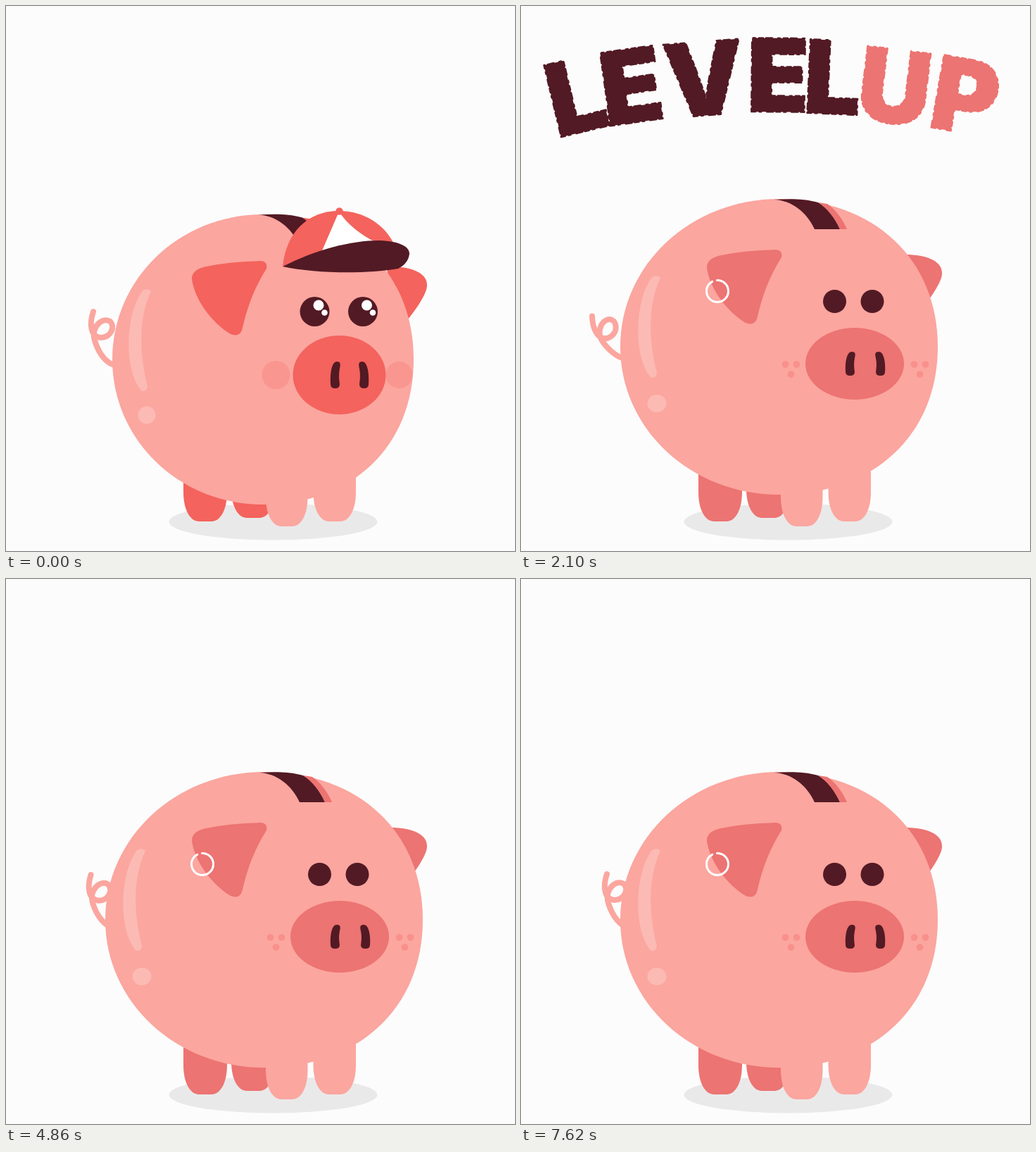
These frames come from a looping animation (723 by 774 pixels, 8100 ms). An HTML page with a canvas:

```html
<!DOCTYPE html>
<html lang="en">
<head>
<meta charset="utf-8">
<title>Level up piggy bank</title>
<style>
  html, body { margin: 0; width: 100%; height: 100%; overflow: hidden; background: #fcfcfc; }
  canvas { display: block; }
</style>
</head>
<body>
<canvas id="stage" width="723" height="774"></canvas>
<script>
const ctx = document.getElementById('stage').getContext('2d');
const LOOP = 8100, STEP = 30;
const BG = '#fcfcfc', SKIN = '#fba69f', DARK = '#521a24', ROSE = '#ec7472', CORAL = '#f4635d';
const SHINE = '#fcbab4', SHADE = '#eae9e9';
const RAD = Math.PI / 180;

// Upright tail, drawn around its pivot
const TAIL = new Path2D('M-50-70C-56-52-54-34-39-33C-24-34-19-49-26-56C-36-63-54-49-48-29C-42-9-31 3-20 6L-8 8');
const EAR = new Path2D('M290 353C315 348 340 347 362 346Q372 347 370 357C353 384 343 410 335.5 443Q332 455 319 450C290 432 268 400 264 372C264 360 275 355 290 353Z');
const FAR_EAR = new Path2D('M540 353C575 352 600 362 598 381C597 395 575 425 560 440Z');
const SLOT = new Path2D('M359 275C385 276 406 293 417 317L453 317C446 301 435 287 422 279C400 273 380 274 359 275Z');
const SLOT_EDGE = new Path2D('M422 279C435 287 446 301 453 317L463 317C457 303 448 290 435 281Z');
const GLOSS = new Path2D('M194 404Q202 400 206 405C192 435 186 480 201 540Q200 548 193 547C168 520 168 440 194 404Z');
const NOSTRIL = new Path2D('M-7 13C-8-4-5-19 2-19C8-19 7-14 6-9C4.5-1 5 6 6 13Q6 19-.5 19Q-7 19-7 13Z');
const CAP = new Path2D('M393 370C398 320 430 291 473 291C510 291 538 312 550 336L520 360Z');
const CAP_PANEL = new Path2D('M473 292L447 352L526 336Q490 318 473 292Z');
const BRIM = new Path2D('M393 370C440 346 490 333 530 333C560 334 573 342 573 352C572 362 565 369 557 373C510 381 440 380 393 370Z');

const WORDS = [
  { color: DARK, enter: 1087, leave: 2900, letters: [
    ['L', 79, 127, -13.5], ['E', 157, 113, -8], ['V', 260, 103, -4.5], ['E', 365.5, 98, 0.5], ['L', 444, 101, 2.5]] },
  { color: ROSE, enter: 1260, leave: 3400, letters: [
    ['U', 531, 114.5, 7], ['P', 633, 128, 10]] }
];
const RISE = 400, STAGGER = 15, DROP = 125;

const clamp = v => Math.max(0, Math.min(1, v));
const ease = v => { v = clamp(v); return v * v * (3 - 2 * v); };

function ellipse(x, y, rx, ry, color) {
  ctx.fillStyle = color;
  ctx.beginPath();
  ctx.ellipse(x, y, rx, ry, 0, 0, 2 * Math.PI);
  ctx.fill();
}

const dot = (x, y, r, color) => ellipse(x, y, r, r, color);

function shape(path, color, dx = 0, dy = 0) {
  ctx.save();
  ctx.translate(dx, dy);
  ctx.fillStyle = color;
  ctx.fill(path);
  ctx.restore();
}

// Round belly, a little fuller on the side of the face
function belly(x, y, rx, ry) {
  const back = 0.555, face = 0.595;
  ctx.fillStyle = SKIN;
  ctx.beginPath();
  ctx.moveTo(x, y - ry);
  ctx.bezierCurveTo(x + rx * face, y - ry, x + rx, y - ry * face, x + rx, y);
  ctx.bezierCurveTo(x + rx, y + ry * face, x + rx * face, y + ry, x, y + ry);
  ctx.bezierCurveTo(x - rx * back, y + ry, x - rx, y + ry * back, x - rx, y);
  ctx.bezierCurveTo(x - rx, y - ry * back, x - rx * back, y - ry, x, y - ry);
  ctx.fill();
}

function leg(x, w, bottom, color) {
  const r = x + w, y = bottom - 42;
  ctx.fillStyle = color;
  ctx.beginPath();
  ctx.moveTo(x, 620);
  ctx.lineTo(x, y);
  ctx.bezierCurveTo(x, bottom - 14, x + 11, bottom, x + 22, bottom);
  ctx.lineTo(r - 22, bottom);
  ctx.bezierCurveTo(r - 11, bottom, r, bottom - 14, r, y);
  ctx.lineTo(r, 620);
  ctx.fill();
}

function tail(x, y, angle) {
  ctx.save();
  ctx.translate(x, y);
  ctx.rotate(-angle * RAD);
  ctx.strokeStyle = SKIN;
  ctx.lineWidth = 8;
  ctx.lineCap = ctx.lineJoin = 'round';
  ctx.stroke(TAIL);
  ctx.restore();
}

function nostrils(x, y, gap, sy) {
  for (const side of [-1, 1]) {
    ctx.save();
    ctx.translate(x + side * gap, y);
    ctx.scale(-side, sy);
    ctx.fillStyle = DARK;
    ctx.fill(NOSTRIL);
    ctx.restore();
  }
}

function torso(x, y, rx, ry, color, stretch) {
  leg(252, 62, 732 + stretch, color);
  leg(320, 62, 727 + stretch, color);
  belly(x, y, rx, ry);
  leg(369, 59.5, 739 + stretch, SKIN);
  leg(436.5, 60.5, 732 + stretch, SKIN);
}

function capPig(angle, stretch) {
  shape(FAR_EAR, CORAL, 0, 17);
  tail(174, 504, angle);
  torso(365, 502, 214, 206, CORAL, stretch);
  shape(SLOT, DARK, -1, 21.5);
  shape(SLOT_EDGE, CORAL, -1, 21.5);
  shape(EAR, CORAL, 0, 16);
  shape(GLOSS, SHINE);
  dot(200, 581, 12.5, SHINE);
  dot(383.5, 524, 20, '#f99690');
  dot(558.5, 524, 19, '#f99690');
  for (const x of [438.5, 507]) {
    dot(x, 434, 21, DARK);
    dot(x + 5.5, 425, 7.5, '#fff');
    dot(x + 14, 435.5, 4.3, '#fff');
  }
  ellipse(473.5, 524, 66, 56, CORAL);
  nostrils(488, 524, 20, 1);
  shape(CAP, CORAL);
  shape(CAP_PANEL, '#fff');
  shape(BRIM, DARK);
  dot(473.5, 291.5, 5.2, CORAL);
}

function ringPig(angle, stretch) {
  shape(FAR_EAR, ROSE);
  tail(172, 489, angle);
  torso(366.5, 484, 225.5, 210, ROSE, stretch);
  shape(SLOT, DARK);
  shape(SLOT_EDGE, ROSE);
  shape(EAR, ROSE);
  shape(GLOSS, SHINE, -8, -19);
  ellipse(193, 564.5, 13.5, 12.5, SHINE);
  ctx.strokeStyle = '#fff';
  ctx.lineWidth = 3;
  ctx.lineCap = 'round';
  ctx.beginPath();
  ctx.arc(279, 405, 15.5, -92 * RAD, 242 * RAD);
  ctx.stroke();
  for (const x of [445.5, 499]) dot(x, 419.5, 16.5, DARK);
  for (const x of [375.5, 558.5]) {
    dot(x, 509, 4.8, '#f8908b');
    dot(x + 16, 509, 4.8, '#f8908b');
    dot(x + 8, 523, 4.8, '#f8908b');
  }
  ellipse(474, 508, 70, 51, ROSE);
  nostrils(489, 508, 21, 0.9);
}

// Uneven dashes along the outline give the letters their rough edge
function letter([char, x, y, tilt], drop, color) {
  ctx.save();
  ctx.translate(x + drop * (430 - x) / 1000, y + drop);
  ctx.rotate(tilt * (1 - 0.4 * drop / DROP) * RAD);
  const m = ctx.measureText(char);
  const dx = (m.actualBoundingBoxLeft - m.actualBoundingBoxRight) / 2;
  const dy = (m.actualBoundingBoxAscent - m.actualBoundingBoxDescent) / 2;
  ctx.fillStyle = ctx.strokeStyle = color;
  ctx.fillText(char, dx, dy);
  ctx.strokeText(char, dx, dy);
  ctx.restore();
}

function title(t) {
  ctx.save();
  // Letters rise from behind an arc under the title
  ctx.beginPath();
  ctx.rect(0, 0, 723, 774);
  ctx.arc(360, 1411, 1250, 0, 2 * Math.PI);
  ctx.clip('evenodd');
  ctx.beginPath();
  ctx.rect(0, 0, 723, 240);
  ctx.clip();
  ctx.font = '900 144px Inter, "Open Sans", sans-serif';
  ctx.textAlign = 'left';
  ctx.textBaseline = 'alphabetic';
  ctx.lineWidth = 2.4;
  ctx.lineCap = ctx.lineJoin = 'round';
  ctx.setLineDash([6, 5, 3, 8, 9, 4]);
  for (const { color, enter, leave, letters } of WORDS) {
    letters.forEach((glyph, i) => {
      const late = t - i * STAGGER;
      const shown = ease((late - enter) / RISE) - ease((late - leave) / RISE);
      if (shown > 0) letter(glyph, DROP * (1 - shown), color);
    });
  }
  ctx.restore();
}

function wag(t) {
  if (t < 900) return 0;
  const phase = (Math.min(t, 7620) - 900) / 570;
  return 42 * Math.cos(Math.PI * (phase - 0.26)) ** 6;
}

function draw(t) {
  ctx.fillStyle = BG;
  ctx.fillRect(0, 0, 723, 774);
  ellipse(379.5, 732.5, 148, 26, SHADE);
  const u = clamp((t - 900) / 720);
  const hop = 4 * u * (1 - u);
  const pig = t < 1320 ? capPig : ringPig;
  ctx.save();
  ctx.translate(0, -75.5 * hop);
  pig(wag(t) + 6 * hop, 9 * hop);
  ctx.restore();
  title(t);
}

function tick() {
  const t = performance.now() % LOOP;
  draw(Math.floor(t / STEP) * STEP);
  requestAnimationFrame(tick);
}
tick();
</script>
</body>
</html>
```
